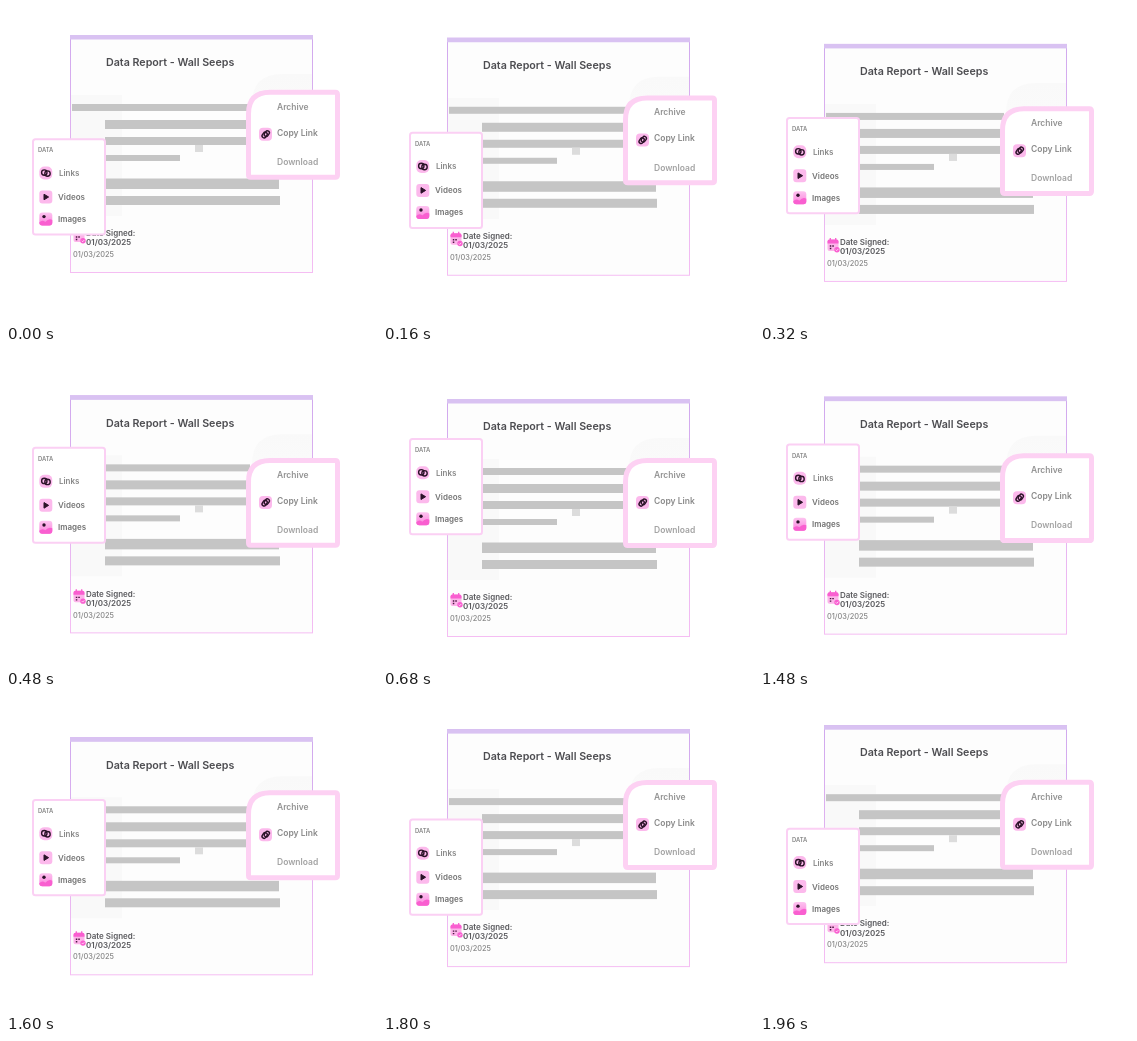
An HTML page for the animation above (2000 ms loop, 371 by 317 pixels).

```html
<!DOCTYPE html>
<html lang="en">
<head>
<meta charset="utf-8">
<title>Data report</title>
<style>
  html, body { margin: 0; width: 100%; height: 100%; overflow: hidden; background: #fff; }
  svg { display: block; width: 100%; height: 100%; }
  text { font-family: Inter, "Liberation Sans", sans-serif; font-weight: 600; }
  .title { font-size: 10.7px; fill: #4c4c50; }
  .date { font-size: 8px; fill: #5a5a5e; }
  .small { font-size: 7.4px; font-weight: 500; fill: #858585; }
  .head { font-size: 5.8px; fill: #858585; }
  .item { font-size: 8px; }
  .menu { font-size: 8.5px; }
  .bars { fill: #c5c5c5; }
  .tile { fill: #fcb9ec; }
  .chain { fill: none; stroke: #2b1228; stroke-width: 1.4; }
</style>
</head>
<body>
<svg viewBox="0 0 371 317">
  <defs>
    <linearGradient id="pink" x1="0" y1="0" x2="0" y2="1">
      <stop offset="0" stop-color="#fdc4f0"/>
      <stop offset="1" stop-color="#fb7fdc"/>
    </linearGradient>
    <linearGradient id="edge" x1="0" y1="0" x2="0" y2="1">
      <stop offset="0" stop-color="#d0a9ee"/>
      <stop offset="1" stop-color="#f5bdf3"/>
    </linearGradient>
    <linearGradient id="shade" x1="0" y1="0" x2="0" y2="1">
      <stop offset="0" stop-color="#f9f9f9"/>
      <stop offset="1" stop-color="#fdfdfd"/>
    </linearGradient>
  </defs>

  <g id="doc">
    <rect x="64.5" y="29.5" width="242" height="237" fill="#fdfdfd" stroke="url(#edge)"/>
    <path d="M306 68H276Q246 68 246 98V170H306Z" fill="url(#shade)"/>
    <rect x="65" y="89" width="51" height="121" fill="#f9f9f9"/>
    <rect x="64" y="29" width="243" height="4.5" fill="#d9c2f2"/>
    <text class="title" x="100" y="60.3">Data Report - Wall Seeps</text>
    <g class="bars">
      <rect x="66" y="98" width="178" height="7"/>
      <rect x="99" y="114" width="174" height="9"/>
      <rect x="99" y="131" width="174" height="8"/>
      <rect x="99" y="149" width="75" height="6"/>
      <rect x="99" y="172.5" width="174" height="10.5"/>
      <rect x="99" y="190" width="175" height="9"/>
    </g>
    <rect x="189" y="139" width="8" height="7" fill="#dcdcdc"/>
    <g>
      <rect x="67.5" y="224.5" width="11" height="11.5" rx="2" fill="#fdb4ea"/>
      <path d="M67.5 228.5v-2q0-2 2-2h7q2 0 2 2v2z" fill="#f95fd0"/>
      <path d="M70.3 223v2.6M75.7 223v2.6" stroke="#f95fd0" stroke-width="1.3"/>
      <path d="M69.8 231h1.5m1 0h1.5M69.8 233.5h1.5" stroke="#4a1740" stroke-width="1.4"/>
      <circle cx="77" cy="234.8" r="2.7" fill="#f95fd0"/>
      <path d="M75.8 234.8l.9.9 1.6-1.7" fill="none" stroke="#fff" stroke-width=".7"/>
    </g>
    <text class="date" x="80" y="230.3">Date Signed:</text>
    <text class="date" x="80" y="239.4">01/03/2025</text>
    <text class="small" x="67" y="251.2">01/03/2025</text>
  </g>

  <g id="left">
    <rect x="27" y="133.3" width="72" height="95.2" rx="2.5" fill="#fff" stroke="#fbd0f4" stroke-width="2"/>
    <text class="head" x="32" y="146.4">DATA</text>
    <rect class="tile" x="33.3" y="160.5" width="13" height="13" rx="5"/>
    <g class="chain">
      <circle cx="38.3" cy="166.6" r="2.7"/>
      <circle cx="41.5" cy="167.6" r="2.7"/>
    </g>
    <text class="item" x="53" y="170" fill="#888">Links</text>
    <rect class="tile" x="33.3" y="184.5" width="13" height="13" rx="3"/>
    <path d="M38 188.2l4.6 2.8-4.6 2.8z" fill="#2b1228" stroke="#2b1228" stroke-linejoin="round"/>
    <text class="item" x="52" y="194" fill="#777">Videos</text>
    <rect x="33.3" y="206.5" width="13" height="13" rx="3" fill="url(#pink)"/>
    <path d="M33.3 216.5q3-3 6-.5 3.5-4 7-2v2.5q0 3-3 3h-7q-3 0-3-3z" fill="#f95fd0"/>
    <circle cx="38" cy="210.6" r="1.7" fill="#2b1228"/>
    <text class="item" x="52" y="216" fill="#6f6f6f">Images</text>
  </g>

  <g id="right">
    <path d="M264 86.3H329.3Q331.5 86.3 331.5 88.5V169Q331.5 171.2 329.3 171.2H244.7Q242.5 171.2 242.5 169V107.8Q242.5 86.3 264 86.3Z"
      fill="#fff" stroke="#fdd1f3" stroke-width="5"/>
    <text class="menu" x="271" y="103.7" fill="#939393">Archive</text>
    <rect class="tile" x="253" y="121.8" width="13" height="13" rx="4"/>
    <g class="chain" transform="rotate(-55 259.5 128.3)">
      <rect x="255.4" y="126" width="6" height="4" rx="2"/>
      <rect x="257.8" y="127" width="6" height="4" rx="2"/>
    </g>
    <text class="menu" x="271" y="129.8" fill="#8a8a8a">Copy Link</text>
    <text class="menu" x="271" y="159" fill="#a3a3a3">Download</text>
  </g>
</svg>
<script>
  const LOOP = 2000, STEP = 40, BACK = LOOP * 2 / 3;
  const parts = [
    { id: 'doc', dy: 19, dur: LOOP / 3 },
    { id: 'left', dy: -45.3, dur: LOOP / 3 },
    { id: 'right', dy: 23.2, dur: 500 }
  ].map(p => ({ ...p, el: document.getElementById(p.id) }));

  const ease = x => {
    x = Math.min(1, Math.max(0, x));
    return x * x * (3 - 2 * x);
  };

  // The motion runs at 25 steps per second.
  function draw() {
    const t = Math.floor(performance.now() % LOOP / STEP) * STEP;
    for (const { el, dy, dur } of parts) {
      const y = dy * (ease(t / dur) - ease((t - BACK) / dur));
      el.setAttribute('transform', `translate(0 ${y.toFixed(2)})`);
    }
    requestAnimationFrame(draw);
  }
  draw();
</script>
</body>
</html>
```
